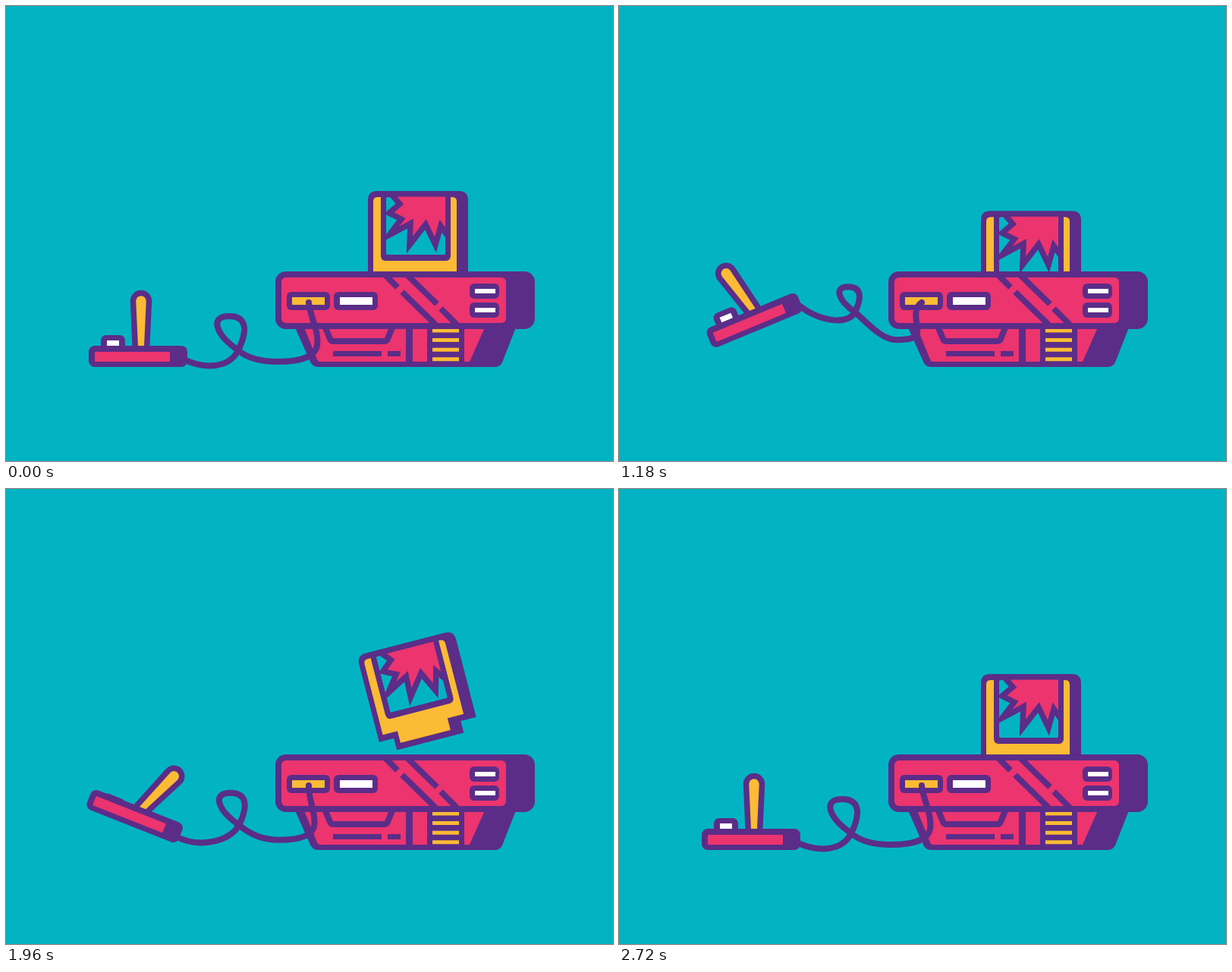
An HTML page for the animation above (3 s loop, 800x600 px).

```html
<!DOCTYPE html>
<html lang="en">
<head>
<meta charset="utf-8">
<title>Game console</title>
<style>
  html, body { margin: 0; width: 100%; height: 100%; overflow: hidden; background: #02b3c4; }
  svg { display: block; width: 100%; height: 100%; }
  .ink { fill: #5b2d88; }
  .pink { fill: #ec346e; }
  .gold { fill: #fbbb34; }
  .sky { fill: #02b3c4; }
  .white { fill: #fff; }
  .line { stroke: #5b2d88; stroke-width: 8; fill: none; }
  .round { stroke-linecap: round; stroke-linejoin: round; }
  .edge { stroke: #5b2d88; stroke-width: 7.5; stroke-miterlimit: 8; }
  .vents { stroke: #fbbb34; stroke-width: 35; stroke-dasharray: 5 7.6; }
</style>
</head>
<body>
<svg viewBox="0 0 800 600">
  <defs>
    <clipPath id="window"><rect x="498" y="248" width="84" height="84"/></clipPath>
    <g id="switch">
      <rect class="ink" x="611" y="366" width="39" height="20" rx="6"/>
      <rect class="white" x="618" y="373" width="27" height="6"/>
    </g>
  </defs>

  <path id="rays" class="line round"/>

  <g id="cartridge">
    <path class="ink" d="M489 244H597Q609 244 609 256V362H588V378H497V362H477V256Q477 244 489 244Z"/>
    <path class="gold" d="M490 252H588Q594 252 594 258V354H572V370H504V354H484V258Q484 252 490 252Z"/>
    <rect class="ink" x="494" y="246" width="92" height="90" rx="6"/>
    <rect class="sky" x="501" y="252" width="78" height="76" rx="2"/>
    <path class="pink edge" clip-path="url(#window)"
      d="M506 246L519 261L505 273L521 281L505 302L533 287L532 315L553 288L566 315L573 290L590 314V246Z"/>
    <path class="line" style="stroke-width:7" d="M497.5 248V330M582.5 248V330M494 248H586"/>
  </g>

  <g id="console">
    <path class="ink" d="M381 424L401 469Q404 476 411 476H644Q651 476 654 470L672 424Z"/>
    <path class="pink" d="M393 424L410 466Q411 469 414 469H611L631 424Z"/>
    <path class="sky line" d="M420 422L427 439Q428 442 432 442H498Q502 442 503 439L510 422"/>
    <path class="ink" d="M431 455H495V462H431ZM503 455H520V462H503ZM527 424H536V470H527ZM555 424H604V470H555Z"/>
    <path class="vents" d="M579.5 425.5V469"/>
    <rect class="ink" x="355" y="350" width="342" height="76" rx="14"/>
    <rect class="pink" x="363" y="358" width="296" height="60" rx="6"/>
    <path class="line" d="M500 355L516 371M522 377L566 420M529 355L568 393M573 399L594 420"/>
    <rect class="ink" x="370" y="377" width="57" height="24" rx="6"/>
    <rect class="gold" x="377" y="384" width="43" height="10"/>
    <rect class="ink" x="432" y="377" width="58" height="24" rx="6"/>
    <rect class="white" x="440" y="384" width="43" height="10"/>
    <use href="#switch"/>
    <use href="#switch" y="25"/>
  </g>

  <path id="cable" class="line round"/>

  <g id="pad">
    <g id="button">
      <rect class="ink" x="125" y="434" width="32" height="28" rx="7"/>
      <rect class="white" x="133" y="441" width="16" height="9"/>
    </g>
    <path id="stick" class="gold edge"
      d="M170.5 454L167.5 389A10.5 10.5 0 0 1 188.5 389L185.5 454Z"/>
    <rect class="ink" x="109" y="448" width="130" height="28" rx="8"/>
    <rect class="pink" x="117" y="456" width="99" height="13" rx="1"/>
  </g>
</svg>

<script>
const LOOP = 3000, HOP_START = 560, HOP_PERIOD = 1040;

const $ = id => document.getElementById(id);
const transform = (id, value) => $(id).setAttribute('transform', value);
const mix = (a, b, k) => a + (b - a) * k;
const span = (t, from, to) => Math.min(1, Math.max(0, (t - from) / (to - from)));
const ramp = (t, from, to) => (1 - Math.cos(Math.PI * span(t, from, to))) / 2;
// Eases up to 1, holds, and eases back to 0.
const pulse = (t, rise, top, leave, end) => ramp(t, rise, top) - ramp(t, leave, end);

// The loop in the cable climbs and tightens as the pad end rises.
function drawCable(endX, endY) {
  const rise = (467 - endY) / 73;
  const k = Math.sign(rise) * Math.abs(rise) ** 0.7;
  const point = (x, y, dx, dy) => (ox = 0, oy = 0) => `${x + dx * k + ox} ${y + dy * k + oy} `;
  const socket = point(399, 391, 0, 0), socketPull = point(401, 410, -14, -12);
  const bend = point(410, 448, -17, -22);
  const belly = point(358, 469, 8, -29);
  const cross = point(306, 454, 5, -51);
  const size = mix(1, 0.74, k);
  const loop = (x, y) => cross(x * size, y * size);

  $('cable').setAttribute('d', `M${socket()}h.01M${socket()}
    C${socketPull()}${bend(3 - 4 * k, -18 + 7 * k)}${bend()}
    S${belly(20)}${belly()}
    S${cross(14, 12)}${cross()}
    C${loop(-30, -21)}${loop(-38, -45)}${loop(-12, -45)}
    S${loop(11, -22)}${cross()}
    S${endX + 30} ${endY + 13 + 10 * k} ${endX} ${endY}`);
}

function drawPad(t) {
  const secondHop = HOP_START + HOP_PERIOD;
  const hop = t - (t < secondHop ? HOP_START : secondHop);
  const tilt = 22 * ramp(hop, 40, 390) - 46 * ramp(hop, 390, 650) + 24 * ramp(hop, 650, 980);
  const x = 174 - 0.2 * tilt;
  const y = 462 - 52 * pulse(hop, 100, 570, 570, 840);
  const lean = 23 * pulse(t, 1260, 1500, 1960, 2180)
    - 13.5 * (pulse(t, 0, 140, 360, 500) + pulse(hop, 350, 590, 700, 980));
  const press = 13 * (pulse(t, 835, 950, 1000, 1120) + pulse(t, 1460, 1560, 1980, 2220));

  transform('pad', `translate(${x} ${y}) rotate(${tilt}) translate(-174 -462)`);
  transform('stick', `rotate(${lean} 178 452)`);
  transform('button', `translate(0 ${press})`);

  const angle = tilt * Math.PI / 180, cos = Math.cos(angle), sin = Math.sin(angle);
  drawCable(x + 62 * cos - 5 * sin, y + 62 * sin + 5 * cos);
}

function drawCartridge(t) {
  const sink = 27 * pulse(t, 1010, 1200, 2130, 2420);
  const flight = 188 * Math.max(0, 1 - ((t - 1710) / 317) ** 2);
  const spin = 360 * ramp(t, 1425, 2040);
  transform('cartridge', `translate(0 ${sink - flight}) rotate(${spin} 543 311)`);
}

function drawRays(t) {
  const head = 1 - (1 - span(t, 2100, 2260)) ** 2;
  const tail = span(t, 2120, 2320) ** 2;
  const ray = (side, x, y, w, h) => {
    const at = k => `${543 + side * (x + w * k)} ${y + h * k}`;
    return `M${at(tail)}L${at(head)}`;
  };
  const both = side => ray(side, 71, 322, 76, -50) + ray(side, 67, 339, 90, -20);
  $('rays').setAttribute('d', head > tail ? both(-1) + both(1) : '');
}

const start = performance.now();
function frame() {
  const t = (performance.now() - start) % LOOP;
  drawPad(t);
  drawCartridge(t);
  drawRays(t);
  requestAnimationFrame(frame);
}
frame();
</script>
</body>
</html>
```
